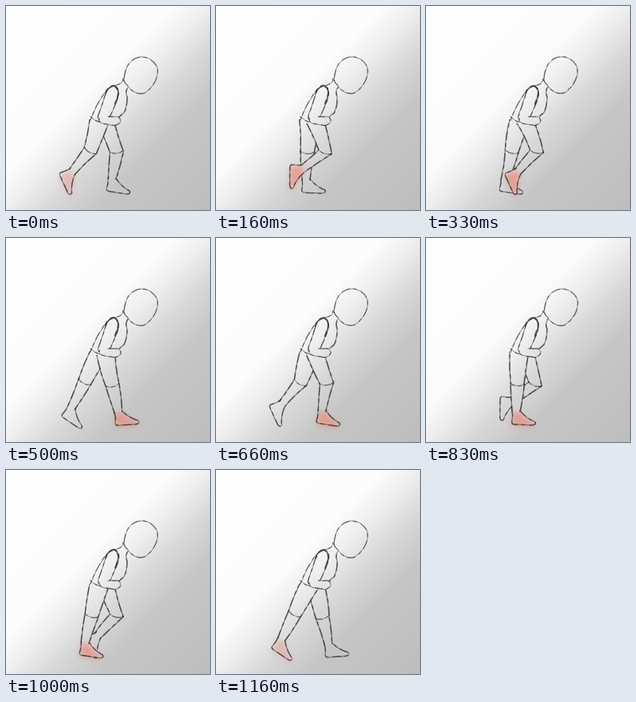
An HTML page with a canvas that plays this animation: 256 by 256 pixels, repeating every 1330 ms.

```html
<!DOCTYPE html>
<html>
<head>
<meta charset="utf-8">
<style>
  html, body { margin: 0; height: 100%; overflow: hidden; }
  canvas { display: block; width: 100vw; height: 100vh; }
</style>
</head>
<body>
<canvas id="stage" width="256" height="256"></canvas>
<script>
const ctx = document.getElementById('stage').getContext('2d');
const LOOP = 1330, STEPS = 8, THIGH = 37, SHIN = 35;

// Ankle track of one stride, from heel strike through push-off and swing
const TRACK = [[141, 219], [133, 217], [113, 218], [99, 217], [82, 213], [83, 208], [109, 204], [115, 208]];
const HIPS = { front: [[114, 147], [137, 149]], back: [[105, 143], [128, 149]] };

const FOOT = new Path2D('M-5 -1Q-4 6 -6 12Q-7 16 -1 16L19 18Q25 18 23 14Q12 9 5 -1');
const HEAD = new Path2D('M148 93C149 80 153 69 164 65C175 61 187 68 190 78C192 89 185 102 174 109C166 112 157 107 153 100Q149 97 148 93Z');
const TORSO = new Path2D('M147 92Q146 97 141 99Q130 101 124 109Q112 125 106 143L118 149L139 149Q148 139 151 129L153 104Z');
const BACK = new Path2D('M147 91Q147 97 140 99Q129 101 123 110Q112 126 106 143M106 139Q111 144 118 146');
const CHEST = new Path2D('M153 102Q149 107 152 114Q152 127 148 134L142 139');
const ARM = new Path2D('M126 107Q121 124 116 137Q114 143 120 144L131 138Q136 127 140 117Q143 105 136 100');
const SHOULDER = new Path2D('M125 110Q128 101 135 100Q142 102 141 111L137 123');
const HAND = new Path2D('M117 141Q116 147 124 148L136 150Q143 149 144 144Q143 138 137 139L129 139');

const shade = ctx.createLinearGradient(0, 0, 256, 256);
[[0, 254], [.41, 252], [.5, 238], [.6, 216], [.72, 198], [1, 189]]
  .forEach(([at, v]) => shade.addColorStop(at, `rgb(${v},${v},${v})`));

const mix = (a, b) => [(a[0] + b[0]) / 2, (a[1] + b[1]) / 2];
const unit = (a, b) => {
  const d = Math.hypot(b[0] - a[0], b[1] - a[1]);
  return [(b[0] - a[0]) / d, (b[1] - a[1]) / d];
};
// Point reached from p by going `along` a direction and `across` to its front side
const offset = (p, [dx, dy], along, across) =>
  [p[0] + dx * along + dy * across, p[1] + dy * along - dx * across];

let seed;
const jitter = size => ((seed = seed * 16807 % 2147483647) / 2147483647 - .5) * size;

// Body parts hide the lines behind them but take the backdrop's own tone
function cover(path) {
  ctx.fillStyle = shade;
  ctx.fill(path);
}

// Light continuous line with darker, broken pressure marks on top
function pencil(path, weight = 1) {
  ctx.strokeStyle = 'rgba(45,45,48,.6)';
  ctx.lineWidth = weight;
  ctx.stroke(path);
  ctx.save();
  ctx.translate(jitter(.8), jitter(.8));
  ctx.setLineDash([10, 5, 4, 6]);
  ctx.lineDashOffset = jitter(25);
  ctx.lineWidth = weight * 1.3;
  ctx.stroke(path);
  ctx.restore();
}

function curve(a, bend, b) {
  const path = new Path2D();
  path.moveTo(...a);
  path.quadraticCurveTo(...bend, ...b);
  return path;
}

function limbLine(a, b) {
  const [x, y] = mix(a, b);
  pencil(curve(a, [x + jitter(4), y + jitter(3)], b), 1.2);
}

function findKnee(hip, ankle) {
  const reach = Math.hypot(ankle[0] - hip[0], ankle[1] - hip[1]);
  const along = (THIGH ** 2 - SHIN ** 2 + reach ** 2) / (2 * reach);
  const across = Math.sqrt(Math.max(0, THIGH ** 2 - along ** 2));
  return offset(hip, unit(hip, ankle), along, across);
}

function drawLeg(phase, blushing) {
  const ankle = TRACK[phase];
  const [hipL, hipR] = (phase + 2) % STEPS < 4 ? HIPS.front : HIPS.back;
  const hip = mix(hipL, hipR);
  const knee = findKnee(hip, ankle);
  const shin = unit(knee, ankle);
  const bend = unit([0, 0], mix(unit(hip, knee), shin));
  const [kneeL, kneeR] = [-8.5, 8.5].map(r => offset(knee, bend, 0, r));
  const [ankleL, ankleR] = [-4.8, 4.8].map(r => offset(ankle, shin, 0, r));

  const shape = new Path2D();
  [hipL, kneeL, ankleL, ankleR, kneeR, hipR].forEach(p => shape.lineTo(...p));
  cover(shape);

  // The higher the ankle, the further the toe points down
  const pitch = (217.5 - ankle[1]) * .11;
  const foot = new Path2D();
  foot.addPath(FOOT, new DOMMatrix().translate(...ankle).rotate(pitch * 180 / Math.PI));
  cover(foot);
  if (blushing) {
    ctx.save();
    ctx.filter = 'blur(3px)';
    ctx.translate(0, 2);
    ctx.fillStyle = `rgba(232,146,130,${Math.min(.8, (ankle[0] - 60) / 50)})`;
    ctx.fill(foot);
    ctx.restore();
  }

  pencil(curve(kneeL, offset(knee, bend, 5, 0), kneeR), .8);
  limbLine(hipL, kneeL);
  limbLine(hipR, kneeR);
  limbLine(kneeL, ankleL);
  limbLine(kneeR, ankleR);
  pencil(foot, 1.1);
}

function drawBody() {
  cover(TORSO);
  cover(HEAD);
  pencil(HEAD, .9);
  pencil(BACK, .9);
  pencil(CHEST, 1.1);
  cover(ARM);
  pencil(ARM, 1);
  pencil(SHOULDER, 1.6);
  cover(HAND);
  pencil(HAND, .9);
}

function draw(step) {
  seed = step * 977 + 4321;
  ctx.fillStyle = shade;
  ctx.fillRect(0, 0, 256, 256);
  const near = (step + 5) % STEPS;
  drawLeg((near + STEPS / 2) % STEPS, false);
  drawLeg(near, true);
  drawBody();
}

ctx.lineCap = ctx.lineJoin = 'round';
const start = performance.now();

function tick() {
  const t = (performance.now() - start) % LOOP;
  // Six drawings a second, held in whole hundredths of a second
  draw(Math.ceil((Math.floor(t / 10) + 1) * .06) - 1);
  requestAnimationFrame(tick);
}
tick();
</script>
</body>
</html>
```
